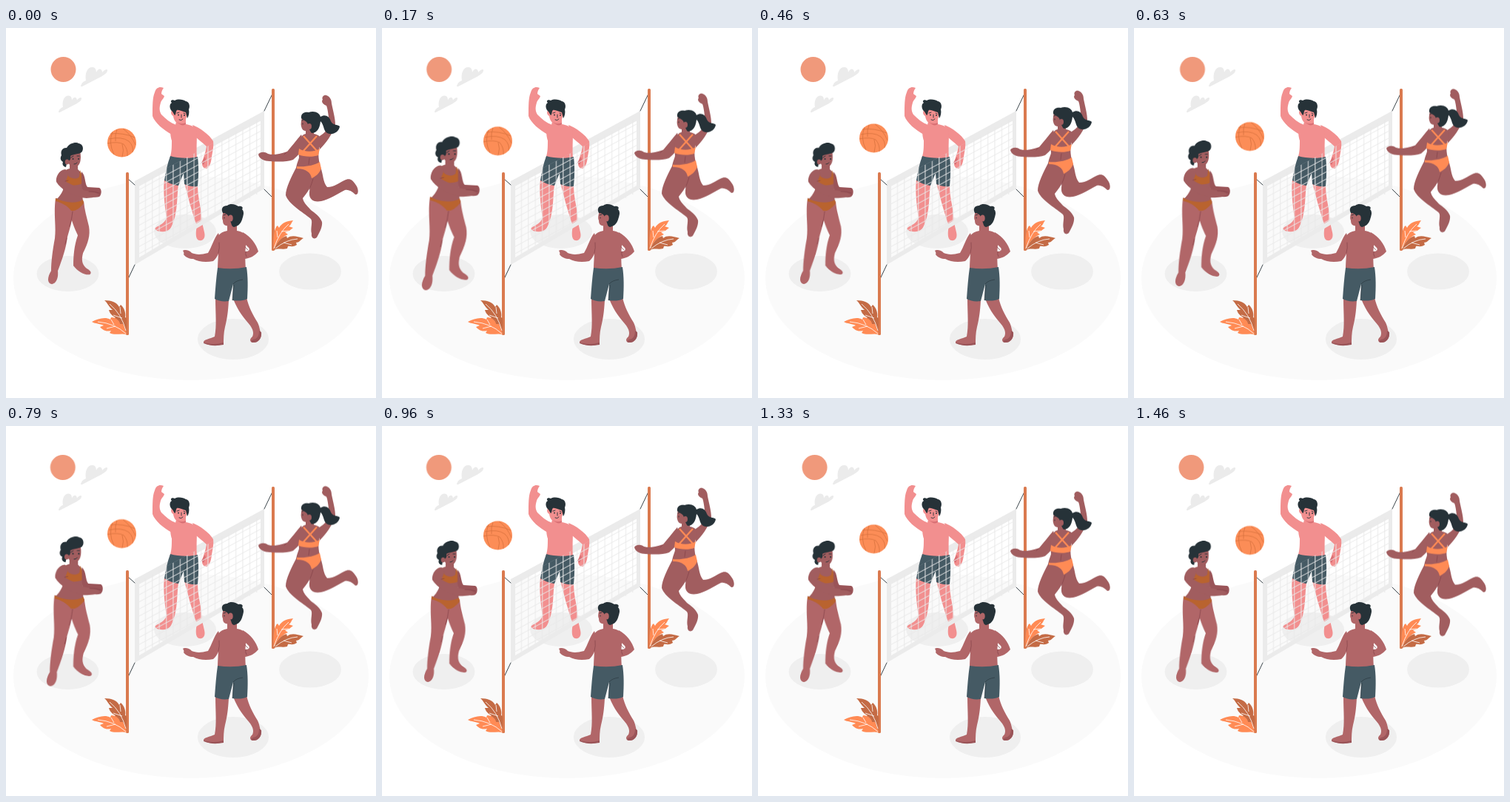
Animation, 500 px wide and 500 px high, one loop 1500 ms. Source, as an HTML page without scripts:

```html
<!DOCTYPE html>
<html lang="en">
<head>
<meta charset="utf-8">
<title>Beach volleyball</title>
<style>
  html, body { margin: 0; width: 100%; height: 100%; overflow: hidden; background: #fff; }
  svg { display: block; width: 100%; height: 100%; }
  .float { animation: float 1.5s linear infinite; }
  .shake { animation: shake 1.5s ease-out infinite; }
  .beat { animation: beat 1.5s ease-out infinite; transform-origin: 92px 251px; }
  @keyframes float { 50% { transform: translateY(-10px); } }
  @keyframes shake {
    10%, 90% { transform: translateX(-1px); }
    20%, 80% { transform: translateX(2px); }
    30%, 50%, 70% { transform: translateX(-4px); }
    40%, 60% { transform: translateX(4px); }
  }
  @keyframes beat {
    0%, 30%, 40%, 60%, 100% { transform: scale(1); }
    10%, 50% { transform: scale(1.1); }
  }
  .floor { fill: #fafafa; }
  .shadow { fill: #efefef; }
  .cloud, .band { fill: #ebebeb; }
  .hair { fill: #263238; }
  .shorts { fill: #455a64; }
  .pink { fill: #f28f8f; }
  .tan { fill: #b16668; }
  .brown { fill: #a15d5f; }
  .deep { fill: #9a5458; }
  .rust { fill: #b9632f; }
  .orange { fill: #ff8b55; }
  .leaf { fill: #c46b45; }
  .pole { fill: #da7a4f; }
  .line { fill: none; stroke: #263238; stroke-width: .9; stroke-linecap: round; }
  .fold { fill: none; stroke: #263238; stroke-width: .8; opacity: .7; }
  .crease { fill: none; stroke: #84434a; stroke-width: .7; stroke-linecap: round; }
  .vein { fill: none; stroke: #fff; stroke-width: .8; }
</style>
</head>
<body>
<svg viewBox="0 0 500 500" preserveAspectRatio="none">
  <defs>
    <path id="cloud" d="M101 79C102 74 105 72 108 71C106 60 111 52 117 53C121 53 122 57 122 60C124 54 130 54 130 60C134 55 138 55 137 58C136 62 132 63 130 65L103 79Z"/>
    <pattern id="mesh" width="9.4" height="9.6" patternUnits="userSpaceOnUse">
      <path d="M5 0V9.6M0 5H9.4" fill="none" stroke="#e9e9e9" stroke-width=".95"/>
    </pattern>
  </defs>

  <ellipse class="floor" cx="250" cy="338" rx="240" ry="138"/>
  <g class="shadow">
    <ellipse cx="83.500" cy="332" rx="42" ry="24"/>
    <ellipse cx="242" cy="275" rx="42" ry="23"/>
    <ellipse cx="411" cy="329" rx="42" ry="24.500"/>
    <ellipse cx="307" cy="420.500" rx="48" ry="27.500"/>
  </g>

  <circle class="shake" cx="77.500" cy="56" r="17" fill="#f0997b"/>
  <use href="#cloud" class="cloud"/>
  <use href="#cloud" class="cloud" transform="translate(-15.900 46) scale(.86)"/>

  <path class="band" d="M174 207L349 112V123L174 217Z"/>

  <!-- Player behind the net -->
  <g class="pink">
    <path d="M224 144C213 138 201 128 198 119C198 104 198 94 201 87C203 80 208 79 213 81C211 84 210 86 210 89L214 92C213 96 210 97 209 101C207 108 207 112 210 117C216 123 222 128 230 131Z"/>
    <path d="M252 131C262 135 275 144 280 153C281 160 279 168 278 174C277 184 274 190 270 190C265 189 264 184 266 178C268 172 270 166 271 160C266 155 260 151 256 147Z"/>
    <path d="M214 205L233 212C231 226 232 240 228 256C224 268 223 274 214 275C206 276 200 273 202 270C206 267 215 264 217 256C215 244 212 220 214 205Z"/>
    <path d="M241 209L259 213C259 228 263 240 264 252C264 262 267 270 268 276C270 284 266 288 261 287C256 286 256 276 258 268C254 256 249 240 246 228Z"/>
    <path d="M229 131C220 135 222 145 224 152C224 162 224 168 221 177L258 178C257 164 258 152 258 140C257 134 250 131 243 130V122H231Z"/>
    <path d="M226 111C222 111 222 117 226 119C227 126 231 130 236 129C243 129 245 120 245 108L230 104Z"/>
  </g>
  <path d="M231 127Q238 134 243 130V128Q236 131 231 127M264 182L269 174L270 178L267 185M269 186L272 179" fill="#d96f74"/>
  <path class="hair" d="M225 113C221 110 220 103 224 101C221 98 225 96 228 98C233 95 240 97 243 99C248 100 249 106 247 110C248 114 247 119 245 122L243 114C238 113 234 110 231 111C229 113 230 117 228 118Z"/>
  <path class="line" d="M231 115L234 114M240 115L242 116M234 124Q237 126 239 123M237 117L237 121"/>
  <g class="hair"><circle cx="233" cy="117.500" r=".9"/><circle cx="241" cy="118" r=".9"/></g>
  <path class="shorts" d="M222 173C232 176 248 177 259 174C261 190 260 203 259 214C252 215 246 213 241 211L240 196L233 213C225 212 219 209 214 206C216 194 218 184 222 173Z"/>
  <path class="fold" d="M240 196Q244 190 246 184M255 177Q253 184 257 188"/>

  <!-- Net -->
  <g transform="translate(174 207) skewY(-28.400)">
    <rect x="5" y="6" width="166" height="101" fill="url(#mesh)"/>
  </g>
  <path class="band" d="M174 207L180 204V310L344 213V115L349 112V217L174 320Z"/>
  <path class="line" d="M165 204L174 212M174 320L165 339M360 89L349 112M349 218L360 229"/>
  <rect class="pole" x="359" y="82" width="4" height="219" rx="1.500"/>

  <!-- Right plant -->
  <path class="orange" d="M362 299C361 284 362 270 367 267L369 270C373 263 379 261 388 260C385 264 385 267 382 268L388 270C383 274 381 275 377 276L381 279C372 283 367 289 362 299Z"/>
  <path class="leaf" d="M362 300C366 289 372 283 379 281L380 284C386 279 394 282 402 284C397 287 396 290 392 290L393 293C387 297 384 294 381 295L380 298C373 300 369 297 362 300Z"/>
  <path class="vein" d="M362 298Q369 276 382 265M367 283L366 274M372 275L382 274M364 298Q378 286 394 285M375 290L386 293"/>

  <!-- Jumping player -->
  <g class="float">
    <path class="brown" d="M424 146C430 142 435 138 437 130C436 120 435 110 433 105C427 103 426 98 428 97C426 93 430 90 433 91C438 93 440 97 440 102C442 112 445 122 445 131C441 144 432 156 424 164Z"/>
    <path class="brown" d="M425 188C429 198 428 208 434 215C444 215 452 208 457 206C464 202 468 205 472 211C477 217 477 226 472 225C467 220 462 218 458 219C448 224 436 232 426 234C416 236 409 232 410 222L412 200Z"/>
    <path class="brown" d="M393 187C386 200 378 216 378 226C382 238 400 248 412 258C415 262 411 270 413 278C412 284 417 286 420 283C424 276 428 268 427 262C424 254 417 250 412 246C406 239 402 236 401 230C407 223 412 215 415 205L425 192Z"/>
    <path class="crease" d="M410 218Q413 211 415 204"/>
    <path class="brown" d="M399 144C392 152 386 160 380 167C368 171 360 172 354 170C349 166 342 168 341 171C342 177 350 180 356 180C368 181 380 181 388 178C395 172 400 166 404 160Z"/>
    <path class="brown" d="M405 136V143C398 144 396 154 395 164L396 175C395 180 393 182 392 190L426 193C424 184 421 174 423 164C427 152 429 146 416 143V132Z"/>
    <path class="brown" d="M400 120C399 126 398 130 399 133C400 138 403 140 408 139L415 132L410 118Z"/>
    <path d="M402 146L421 167M420 146L402 166" fill="none" stroke="#ff8b55" stroke-width="2.200"/>
    <path class="orange" d="M396 163C404 168 416 168 424 163L422 172C414 175 402 174 395 171Z"/>
    <path class="orange" d="M393 187C404 188 416 186 424 181L426 190C423 197 418 201 413 203C412 196 406 190 393 190Z"/>
    <path class="crease" d="M410 176L409 184M379 168L376 171"/>
    <path class="hair" d="M399 122C398 115 404 113 409 114C417 111 424 115 425 120C431 116 437 119 439 126C442 132 448 130 451 133C450 140 443 144 437 143C428 141 431 132 425 126C424 136 420 142 413 142C409 137 409 132 407 128C405 125 402 125 399 122Z"/>
    <ellipse class="brown" cx="410" cy="133" rx="3" ry="4"/>
    <path class="line" d="M400 125L402 124M401 129V130"/>
  </g>

  <!-- Ball -->
  <g class="float">
    <circle cx="156.500" cy="155" r="19.500" fill="#fc8d57"/>
    <path d="M141 143Q158 141 174 148M139 150Q156 146 166 153Q173 160 171 168M137 156Q151 153 159 157Q165 164 164 173M150 137Q147 145 148 153M158 136Q169 144 175 158M157 157Q160 165 157 174M144 140Q138 155 146 171" fill="none" stroke="#d9733f" stroke-width=".8"/>
  </g>

  <!-- Left player -->
  <g class="beat">
    <path class="tan" d="M84 242C88 260 93 272 97 280C92 294 91 308 91 321C97 329 106 334 113 333C117 330 113 327 108 324C102 318 102 312 104 304C111 290 114 280 112 268C109 256 106 246 105 234Z"/>
    <path class="tan" d="M67 230C64 252 68 266 66 284C63 300 61 316 61 328C56 336 55 345 62 346C68 345 71 338 70 328C76 312 81 298 83 282C88 266 90 256 91 246L95 234Z"/>
    <path class="crease" d="M90 248Q89 258 86 268M80 292L82 284"/>
    <path class="brown" d="M86 182V190C78 192 76 196 78 206C80 216 76 224 67 233C78 238 94 242 104 238C104 230 102 222 104 212C107 206 105 198 97 191V184Z"/>
    <path class="rust" d="M82 191L84 200C88 204 96 205 99 201L100 192L105 207C104 213 88 214 81 211ZM67 230C78 236 95 238 104 232L105 237C99 244 94 248 88 247C83 240 75 236 67 234Z"/>
    <path class="deep" d="M102 194C108 200 106 210 110 215L126 216C130 218 129 226 126 228C120 230 112 228 104 224L102 212Z"/>
    <path class="brown" d="M80 191C71 192 67 202 68 208C74 218 88 226 100 229C110 231 122 229 125 226C124 222 114 221 104 219C95 214 86 211 80 207C85 200 85 193 80 191Z"/>
    <path class="crease" d="M80 207L84 206M112 221Q120 221 126 223"/>
    <path class="brown" d="M82 168C82 184 87 188 93 188C101 187 102 176 100 166L86 164Z"/>
    <path class="hair" d="M81 188C76 187 76 183 77 181C73 179 73 175 75 172C73 166 77 161 82 162C86 155 95 154 98 156C105 157 105 165 102 168C98 171 91 170 87 173C88 177 86 181 83 179Z"/>
    <ellipse class="brown" cx="82.500" cy="181" rx="2.800" ry="3.500"/>
    <path class="line" d="M88 175L91 173M96 173L99 173M92 184Q95 184 96 182"/>
    <g class="hair"><circle cx="90.500" cy="177" r="1"/><circle cx="98" cy="177" r="1"/></g>
  </g>

  <!-- Left pole and plant -->
  <rect class="pole" x="162" y="195" width="4" height="220" rx="1.500"/>
  <path class="leaf" d="M162 412C156 403 152 396 145 393L148 391C143 389 140 385 139 381L144 381C139 377 137 371 133 368C143 368 150 371 153 377L155 374C161 379 162 387 161 391L163 392C164 399 163 406 162 412Z"/>
  <path class="orange" d="M163 414C154 412 148 416 140 412L142 409C134 411 130 407 127 404L132 402C126 399 121 400 116 397C124 393 134 390 141 394L142 391C150 391 154 397 154 400L158 400C161 405 162 409 163 414Z"/>
  <path class="vein" d="M162 409Q156 386 140 373M157 392L145 388M155 386L154 377M162 413Q147 399 124 397M148 403L136 406M146 401L142 394"/>

  <!-- Front player -->
  <path class="tan" d="M283 366L301 368C300 384 299 392 296 404C294 412 294 420 294 427C288 430 270 429 267 425C266 421 276 420 282 417C285 402 283 386 283 366Z"/>
  <path class="tan" d="M307 366L325 364C328 378 334 388 340 398C343 404 343 410 345 414C345 420 340 426 333 425C329 424 329 420 333 417C335 412 334 408 330 402C322 392 314 384 307 366Z"/>
  <path class="deep" d="M267 425Q280 429 294 425V428Q278 431 267 426ZM345 411C346 419 341 426 333 425C330 424 331 422 334 421C340 420 342 416 342 409Z"/>
  <path class="tan" d="M320 276C331 282 338 292 341 302C336 308 330 311 323 312V302C328 302 330 300 328 297L322 291Z"/>
  <path class="tan" d="M287 277C281 284 278 296 273 304C262 307 256 306 251 304C248 300 241 299 239 301C240 303 241 304 240 306C243 310 248 312 253 312C260 316 270 317 280 315C286 310 290 300 291 290Z"/>
  <path class="tan" d="M299 264V274C288 276 284 282 286 292C288 304 286 314 286 327H324C323 312 323 304 324 294C330 285 327 277 312 274V264Z"/>
  <path class="crease" d="M288 290Q289 297 287 304M323 296L327 300M325 309Q323 306 324 302"/>
  <path class="shorts" d="M286 324Q306 327 325 323C327 336 327 350 326 366C320 369 313 369 306 368L307 346L301 369C294 370 287 369 282 366C283 352 284 338 286 324Z"/>
  <path class="fold" d="M307 346Q311 341 320 340M306 368L308 347"/>
  <path class="tan" d="M294 246C293 252 291 256 293 260C293 266 296 268 302 267L309 262L305 246Z"/>
  <path class="hair" d="M293 250C290 244 293 240 299 240C304 236 311 239 314 241C319 240 321 243 319 245C323 249 320 255 319 259C317 265 313 268 308 269C304 268 305 264 303 261C302 256 300 250 293 250Z"/>
  <ellipse class="tan" cx="303.500" cy="257" rx="3.200" ry="4.500"/>
  <path class="line" d="M294 253L297 252M295 256V257"/>
</svg>
</body>
</html>
```
